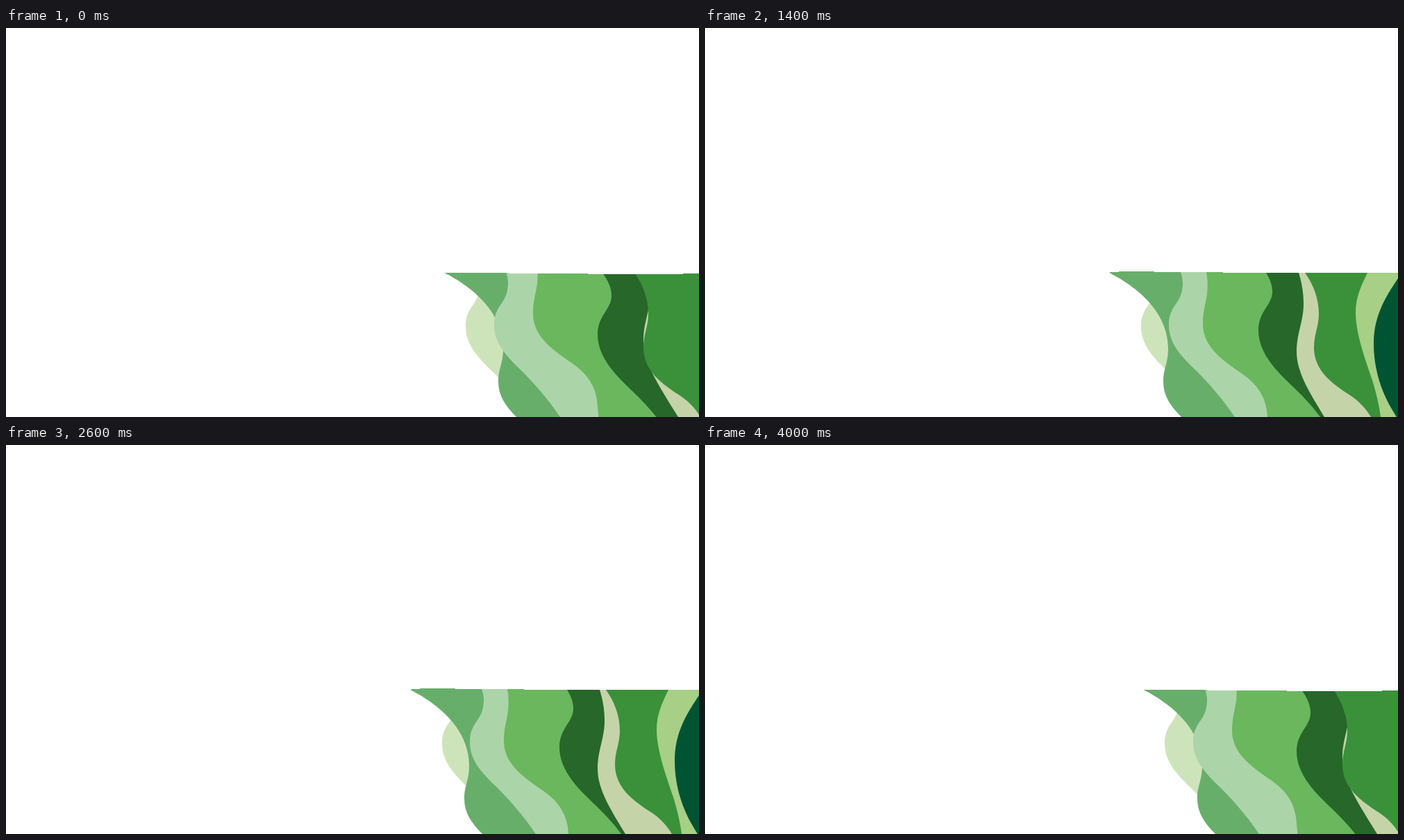
An HTML page with a canvas that plays this animation: 998 px wide and 561 px high, repeating every 4200 ms.

```html
<!DOCTYPE html>
<html lang="en">
<head>
<meta charset="utf-8">
<title>Green waves</title>
<style>
html, body { margin: 0; width: 100%; height: 100%; overflow: hidden; background: #fff; }
canvas { display: block; }
</style>
</head>
<body>
<canvas id="stage" width="998" height="561"></canvas>
<script>
const ctx = document.getElementById('stage').getContext('2d');
const W = 998, H = 561, STEP = 200;

// Left edge of each band; dx and dy hold the shift in poses 0, 3, 4, 5, 6, 7.
const bands = [
  { color: '#cde4bb', dx: [34, 13, 6, 6, 0, 0],
    edge: 'M645 354C648 362 649 370 647 380C644 400 628 404 628 430C628 457 645 474 663 492C682 510 705 536 723 563' },
  { color: '#68ae6b', dx: [49, 21, 21, 11, 11, 0],
    edge: 'M578 351C608 365 667 402 667 462C667 485 660 490 660 510C660 530 670 545 686 561' },
  { color: '#abd5a8', dx: [35, 18, 7, 7, 0, 0],
    edge: 'M685 352C688 360 689 368 687 378C684 398 668 402 668 428C668 455 685 472 703 490C722 508 745 534 763 561' },
  { color: '#6ab75e', dx: [42, 21, 21, 10, 10, 0], dy: [-15, 0, 0, 0, 0, 0],
    edge: 'M720 340L722 352C724 362 724 374 723 384C721 398 717 408 717 427C717 462 750 482 774 499C800 517 809 538 810 561L812 582' },
  { color: '#27672a', dx: [55, 24, 7, 7, 0, 0], dy: [6, 0, 0, 0, 0, 0],
    edge: 'M801 343L808 353C813 361 817 370 817 380C817 400 797 408 797 436C797 469 824 496 848 518.5C863 533 876 547 886 561' },
  { color: '#c5d3a9', dx: [66, 34, 34, 10, 10, 0], dy: [-16, -16, -16, -16, -16, 0],
    edge: 'M848 330L855 353C859 366 862 380 862 398C862 423 852 440 852 467C852 498 873 529 892 561L902 577' },
  { color: '#3a913a', dx: [41, 28, 17, 7, 0, 0],
    edge: 'M856 340L864 353C876 370 884 390 884 412C884 431 877 441 877 461C877 495 905 514 928 529C942 538 952 549 959 561' },
  { color: '#a7cf86', dx: [63, 35, 35, 11, 11, 0], dy: [12, 12, 12, 12, 12, 0],
    edge: 'M959 341L954 353C945 372 937 388 937 410C937 440 950 475 961 508C967 528 971 545 973 561' },
  { color: '#005434', dx: [44, 27, 14, 14, 0, 0], dy: [-20, -20, 0, 0, 0, 0],
    edge: 'M1003 352L998 361C980 388 963 415 963 455C963 495 976 526 987 546L997 563L1010 586' }
];
for (const b of bands) {
  const top = b.edge.match(/^M\d+ (\d+)/)[1];
  b.path = new Path2D(`${b.edge}V600H1100V${top}Z`);
}

const order = [0, 1, 2, 3, 4, 5, 6, 7, 6, 5, 4, 5, 6, 7, 6, 5, 3, 4, 2, 1, 0];
const easeIn = [1, 0.71, 0.25, 0];

function shift(values, pose) {
  if (!values) return 0;
  if (pose > 3) return values[pose - 2];
  return values[1] + (values[0] - values[1]) * easeIn[pose];
}

// The flat top is slightly stepped: pairs of start x and y.
const lowTop = [[609, 353], [724, 354], [838, 355], [975, 354]];
const highTop = [[583, 352], [596, 351], [647, 352], [746, 353]];

function clipTop(steps) {
  ctx.beginPath();
  steps.forEach(([x, y], i) => {
    const end = i + 1 < steps.length ? steps[i + 1][0] : W;
    ctx.rect(x, y, end - x, H - y);
  });
  ctx.clip();
}

function draw(pose) {
  ctx.fillStyle = '#fff';
  ctx.fillRect(0, 0, W, H);
  ctx.save();
  clipTop(pose < 5 ? lowTop : highTop);
  for (const b of bands) {
    ctx.save();
    ctx.translate(shift(b.dx, pose), shift(b.dy, pose));
    ctx.fillStyle = b.color;
    ctx.fill(b.path);
    ctx.restore();
  }
  ctx.restore();
}

const start = performance.now();
function tick() {
  const i = Math.floor((performance.now() - start) / STEP) % order.length;
  draw(order[i]);
  requestAnimationFrame(tick);
}
tick();
</script>
</body>
</html>
```
